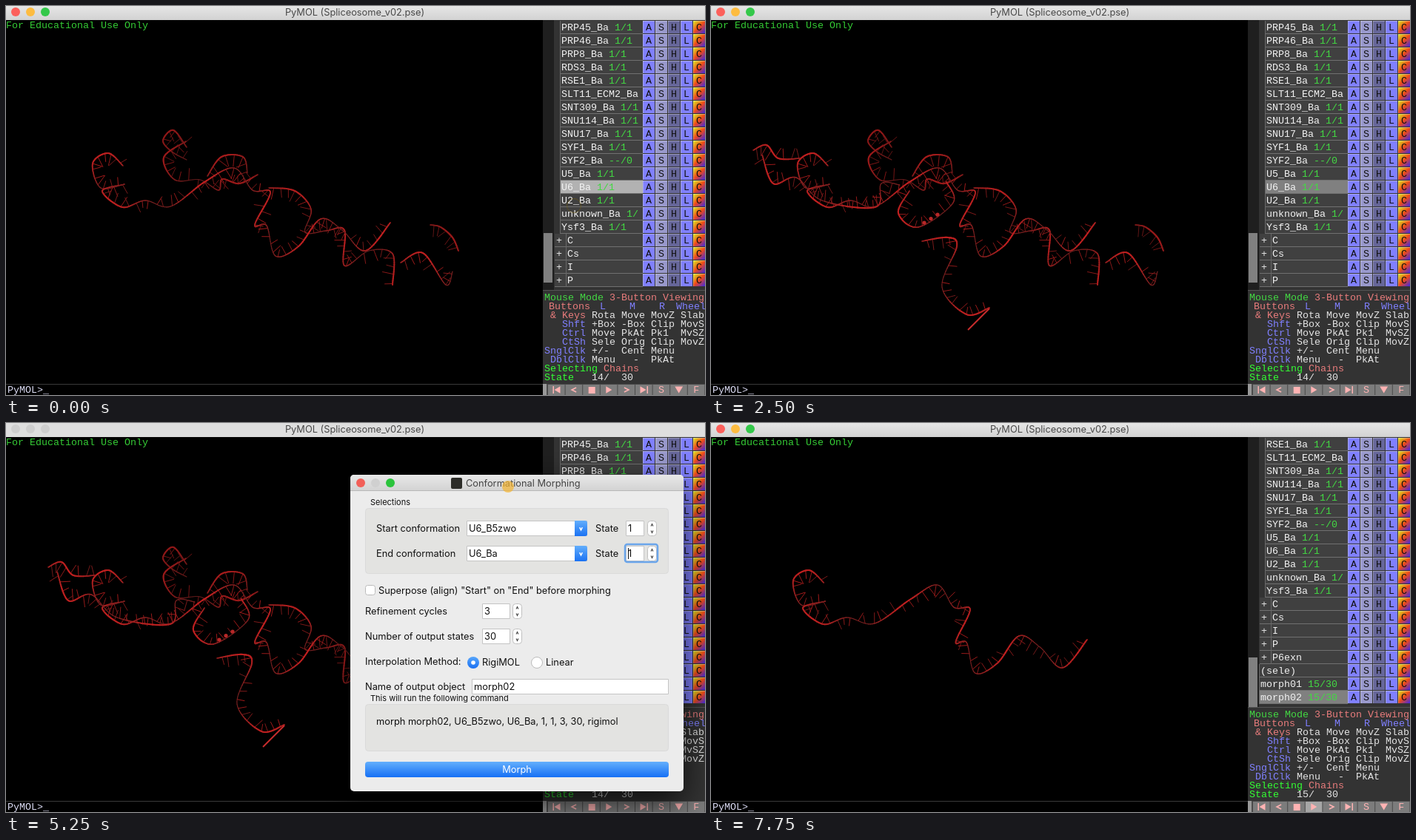
An HTML page with a canvas that plays this animation: 944x526 px, repeating every 8 s.

```html
<!DOCTYPE html>
<html lang="en">
<head>
<meta charset="utf-8">
<title>Morphing</title>
<style>
html, body { margin: 0; width: 944px; height: 526px; overflow: hidden; background: #000; }
canvas { display: block; }
</style>
</head>
<body>
<canvas id="stage" width="944" height="526"></canvas>
<script>
const ctx = document.getElementById('stage').getContext('2d');
const LOOP = 8000, STEP = 250;
// Moments at which the picture changes abruptly, in ms.
const RELEASE = 250, MENU = 2750, MENU_END = 4000, BLUR = 4250, DIALOG = 5250, RESULT = 6500, SCROLL = 7000, PLAY = 7250;
const MONO = '13.33px "Liberation Mono", monospace';
const sans = size => `${size}px Inter, sans-serif`;
const GREEN = '#43d843', RED = '#e87c7c', BLUE = '#8080ff', WHITE = '#e4e4e4';

// ---------- helpers ----------
const mix = (a, b, k) => a + (b - a) * k;
const points = str => str.split(' ').map(p => p.split(',').map(Number));

function rect(x, y, w, h, fill, radius = 0, stroke) {
  ctx.beginPath();
  ctx.roundRect(x, y, w, h, radius);
  ctx.fillStyle = fill;
  ctx.fill();
  if (stroke) { ctx.strokeStyle = stroke; ctx.lineWidth = 1; ctx.stroke(); }
}
function text(str, x, y, color, font = MONO, align = 'left') {
  ctx.font = font;
  ctx.fillStyle = color;
  ctx.textAlign = align;
  ctx.fillText(str, x, y);
}
function disc(x, y, r, fill, stroke) {
  ctx.beginPath();
  ctx.arc(x, y, r, 0, 7);
  if (fill) { ctx.fillStyle = fill; ctx.fill(); }
  if (stroke) { ctx.strokeStyle = stroke; ctx.lineWidth = 1; ctx.stroke(); }
}
function line(pts, color, width = 1) {
  ctx.beginPath();
  pts.forEach(([x, y]) => ctx.lineTo(x, y));
  ctx.strokeStyle = color;
  ctx.lineWidth = width;
  ctx.stroke();
}
function chevron(x, y, dx, dy, color, width) {
  // (dx, dy) points to the tip.
  line([[x - dx + dy, y - dy + dx], [x + dx, y + dy], [x - dx - dy, y - dy - dx]], color, width);
}
function triangle(x, y, dx, dy, color) {
  ctx.beginPath();
  ctx.moveTo(x + dx, y + dy);
  ctx.lineTo(x - dx - dy * 1.2, y - dy - dx * 1.2);
  ctx.lineTo(x - dx + dy * 1.2, y - dy + dx * 1.2);
  ctx.fillStyle = color;
  ctx.fill();
}
function gradient(x0, y0, x1, y1, ...stops) {
  const g = ctx.createLinearGradient(x0, y0, x1, y1);
  stops.forEach((c, i) => g.addColorStop(i / (stops.length - 1), c));
  return g;
}

// ---------- RNA strands, each a spline through a few key points ----------
const firstRna = [
  '244,191 226,168 212,182 224,197 244,208',
  '243,183 213,205 228,235 262,235 287,249 292,234 315,240 340,228',
  '272,230 291,204 320,204 326,226',
  '355,246 390,250 412,275 404,306 432,304 457,303 457,351 490,331 522,335 522,377',
  '533,347 563,334 594,377 603,359'
].map(points);
const secondRna = points('158,216 138,199 117,213 128,246 160,241 130,250 157,272 188,263 222,271 268,238 308,219 333,249 357,252 336,296 352,297 364,338 395,325 425,288 454,303 485,331 519,293');
const fragment = points('573,296 587,299 603,313 611,331');
const thirdRna = [
  '57,195 75,188 91,206 120,206',
  '69,201 84,240 115,232 150,263 222,272 230,240 255,242',
  '268,250 253,280 280,299 327,266 318,238',
  '285,318 320,313 332,325 312,380 345,417 376,408'
].map(points);

// The second RNA slides left and, early in the morph, lifts its left arm.
function morphPose(state) {
  const k = (30 - state) / 15;
  return secondRna.map(([x, y]) => [
    x + k * (8 * Math.exp(-(((x - 265) / 60) ** 2)) - 6 - 0.02 * Math.max(0, x - 265)),
    y - 28 * Math.max(0, k - 1) * Math.max(0, 1 - (x - 110) / 200)
  ]);
}

function sampleSpline(pts) {
  const out = [];
  for (let i = 0; i < pts.length - 1; i++) {
    const [a, b, c, d] = [-1, 0, 1, 2].map(o => pts[Math.min(pts.length - 1, Math.max(0, i + o))]);
    for (let u = 0; u < 1; u += 1 / 16) {
      out.push([0, 1].map(k => b[k] + u / 2 * (c[k] - a[k] +
        u * (2 * a[k] - 5 * b[k] + 4 * c[k] - d[k] + u * (3 * (b[k] - c[k]) + d[k] - a[k])))));
    }
  }
  return [...out, pts[pts.length - 1]];
}

// Backbone ribbon with base sticks on the inner side of each bend.
function drawStrand(pts, seed, light = 1) {
  const curve = sampleSpline(pts);
  const random = () => (seed = (seed * 16807) % 2147483647) / 2147483647;
  let travelled = 0, next = 5, side = 1;
  ctx.lineCap = 'round';
  for (let i = 1; i < curve.length; i++) {
    const [x0, y0] = curve[i - 1], [x, y] = curve[i];
    const shade = Math.sin(travelled / 22);
    line([[x0, y0], [x, y]], `rgb(${light * (152 + 38 * shade)},${light * 32},${light * 32})`, 1.6 + 0.5 * shade);
    travelled += Math.hypot(x - x0, y - y0);
    const p = curve[Math.max(0, i - 8)], q = curve[Math.min(curve.length - 1, i + 8)];
    const bend = (x - p[0]) * (q[1] - y) - (y - p[1]) * (q[0] - x);
    if (Math.abs(bend) > 8) side = Math.sign(bend);
    if (travelled > next) {
      next = travelled + 7 + random() * 5;
      const angle = Math.atan2(q[1] - p[1], q[0] - p[0]) + side * (1.57 + (random() - 0.5) * 0.7);
      const size = 9 + random() * 7;
      line([[x, y], [x + size * Math.cos(angle), y + size * Math.sin(angle)]],
        `rgb(${light * (110 + 55 * random())},${light * 26},${light * 26})`);
    }
  }
  ctx.lineCap = 'butt';
}

function drawMolecule(t, state) {
  const loaded = t < RESULT;
  if (t < SCROLL) firstRna.forEach((s, i) => drawStrand(s, 71 + i, 0.75 + 0.06 * i));
  if (loaded || t >= SCROLL) drawStrand(loaded ? secondRna : morphPose(state), 417);
  if (loaded) drawStrand(fragment, 33, 0.8);
  if (loaded && t >= RELEASE) {
    thirdRna.forEach((s, i) => drawStrand(s, 205 + i));
    line([[376, 409], [347, 438]], '#c82c2c', 2);
    for (let i = 0; i < 3; i++) disc(288 + 9 * i, 293 - 5.5 * i, 2.6, '#b82828');
  }
}

// ---------- object panel ----------
const members = 'PRP45 PRP46 PRP8 RDS3 RSE1 SLT11_ECM2 SNT309 SNU114 SNU17 SYF1 SYF2 U5 U6 U2 unknown Ysf3'.split(' ');
const rows = [
  ...members.map(m => ({ name: m + '_Ba', count: m === 'SYF2' ? '--/0' : '1/1', x: 750 })),
  ...['C', 'Cs', 'I', 'P', 'P6exn'].map(name => ({ name, x: 758, group: true })),
  ...['(sele)', 'morph01', 'morph02'].map(name => ({ name, x: 742, morph: name[0] === 'm' }))
];
const buttons = { A: '#8080ff', S: '#9999cc', H: '#666699', L: '#8080ff', C: null };

function drawRow(row, y, t, state) {
  const cell = (x, w, fill) => { rect(x, y, w, 17, fill); rect(x, y + 17, w, 1, '#707070'); };
  let fill = '#404040';
  if (row.name === 'U6_Ba' && t < RESULT) fill = t < RELEASE ? '#b2b2b2' : '#808080';
  if (row.name === 'morph02') fill = '#808080';
  cell(row.x - 1, 861 - row.x, fill);
  rect(row.x - 2, y, 1, 18, '#686868');
  if (row.group) {
    cell(741, 15, '#404040');
    text('+', 743, y + 13, WHITE);
  }
  text(row.name, row.x, y + 13, '#f2f2f2');
  // The panel is 13 characters wide.
  const count = row.morph ? state + '/30' : row.count || '';
  text(count.slice(0, Math.max(0, 12 - row.name.length)), row.x + 8 * (row.name.length + 1), y + 13, GREEN);

  Object.entries(buttons).forEach(([label, color], i) => {
    const x = 860 + 17 * i;
    rect(x, y, 16, 17, color || gradient(x, y, x + 16, y + 17, '#d8f020', '#f04a18', '#3a28e8'));
    rect(x, y, 16, 1, '#ffffff55');
    rect(x, y, 1, 17, '#ffffff44');
    text(label, x + 4, y + 13, '#111');
  });
}

const modeLines = [
  ['Shft', '+Box -Box Clip MovS'], ['Ctrl', 'Move PkAt Pk1  MvSZ'], ['CtSh', 'Sele Orig Clip MovZ'],
  ['SnglClk', '+/-  Cent Menu'], ['DblClk', 'Menu   -  PkAt']
];

function drawMouseMode(state) {
  text('Mouse Mode', 727, 398, GREEN);
  text('3-Button Viewing', 815, 398, RED);
  text('Buttons', 733, 410, RED);
  text('L    M    R', 802, 410, BLUE);
  text('Wheel', 905, 410, BLUE);
  text('& Keys', 735, 422, RED);
  text('Rota Move MovZ Slab', 791, 422, WHITE);
  modeLines.forEach(([key, actions], i) => {
    text(key, 783, 434 + 12 * i, BLUE, MONO, 'right');
    text(actions, 791, 434 + 12 * i, WHITE);
  });
  text('Selecting', 727, 494, '#33ff33');
  text('Chains', 807, 494, RED);
  text('State', 727, 506, '#33ff33');
  text(String(state).padStart(2) + '/  30', 791, 506, WHITE);
}

function drawControls(playing) {
  const pink = '#ffb3b3', y = 519, at = i => 743.5 + 23.6 * i;
  rect(725, 511, 219, 15, '#4a4a4a');
  rect(725, 511, 5, 15, '#999');
  for (let i = 0; i < 9; i++) rect(at(i) - 11.5, 512, 22.6, 14, playing && i === 3 ? '#a6a6a6' : '#7c7c7c');
  rect(at(0) - 5, 514, 1.5, 10, pink);
  triangle(at(0) + 1, y, -4, 0, pink);
  chevron(at(1), y, -3, 0, pink, 1.6);
  rect(at(2) - 4, 515, 9, 9, pink);
  triangle(at(3), y, 4, 0, pink);
  chevron(at(4), y, 3, 0, pink, 1.6);
  triangle(at(5) - 1, y, 4, 0, pink);
  rect(at(5) + 4, 514, 1.5, 10, pink);
  text('S', at(6), 523, pink, MONO, 'center');
  triangle(at(7), y, 0, 4.5, pink);
  text('F', at(8), 523, pink, MONO, 'center');
}

function drawPanel(t, state) {
  const scrolled = t >= SCROLL;
  rect(725, 19, 219, 492, '#333');
  rect(725, 19, 15, 366, '#1f1f1f');
  rect(726, scrolled ? 317 : t >= RESULT ? 304 : 307, 12, 67, '#808080');
  const first = scrolled ? 4 : 0;
  rows.slice(first, first + 20).forEach((row, i) => drawRow(row, 20 + 18 * i, t, state));
  rect(725, 384, 219, 1, '#555');
  drawMouseMode(state);
  drawControls(t >= PLAY);
}

// ---------- window, menu, dialog ----------
function trafficLights(x, y, colors) {
  colors.forEach((c, i) => disc(x + 20 * i, y, 6, c));
}

function drawWindow(t, state) {
  const inactive = t >= BLUR && t < RESULT;
  rect(0, 0, 944, 526, '#000');
  drawMolecule(t, state);
  text('For Educational Use Only', 0, 30, '#35cc35');
  rect(0, 511, 725, 1, '#3a3a3a');
  text('PyMOL>_', 2, 523, '#dcdcf4');
  drawPanel(t, state);
  rect(0, 0, 944, 19, inactive ? '#dedede' : gradient(0, 0, 0, 19, '#e6e6e6', '#d2d2d2'));
  trafficLights(13, 8, inactive ? Array(3).fill('#cecece') : ['#fc605b', '#fdbc40', '#34c84a']);
  text('PyMOL (Spliceosome_v02.pse)', 471, 13, '#484848', sans(12.8), 'center');
}

const menuGroups = [['Plugin Manager'], ['Legacy Plugins'],
  ['Sheet Exporter', 'Lighting Settings', 'APBS Electrostatics', 'Alignment', 'Morphing']];

function drawMenu(pointerY) {
  ctx.save();
  ctx.shadowColor = '#0008';
  ctx.shadowBlur = 14;
  rect(620, -6, 177, 167, gradient(0, 0, 0, 161, '#bababa', '#9e9e9e'), 5);
  ctx.restore();
  menuGroups.forEach((group, g) => {
    if (g) rect(620, 31 * g - 6, 177, 1, '#8a8a8a');
    group.forEach((label, i) => {
      const y = 31 * g + 19 * i;
      const hot = pointerY >= y && pointerY < y + 19;
      if (hot) rect(620, y, 177, 19, gradient(0, y, 0, y + 19, '#1068e0', '#0459d2'));
      text(label, 641, y + 14, hot ? '#fff' : '#000', sans(13.6));
    });
  });
  triangle(780, 40, 4.5, 0, '#111');
}

function label(str, x, y, size = 12.8) { text(str, x, y, '#111', sans(size)); }
function field(x, y, w, value) {
  rect(x + 0.5, y + 0.5, w - 1, 20, '#fff', 0, '#c4c4c4');
  label(value, x + 3, y + 15);
}
function stepper(x, y) {
  rect(x + 0.5, y + 0.5, 12, 20, '#fff', 4, '#c0c0c0');
  chevron(x + 6.5, y + 6, 0, -1.4, '#444', 1.2);
  chevron(x + 6.5, y + 15, 0, 1.4, '#444', 1.2);
}
function groupBox(title, x, y, h) {
  label(title, 492, y - 4, 11);
  rect(x + 0.5, y + 0.5, 409, h, '#e3e3e1', 4, '#dadada');
}
function numberRow(title, y, value) {
  label(title, 485, y + 15);
  field(643, y, 38, value);
  stepper(684, y);
}
function conformationRow(title, y, value) {
  label(title, 500, y + 15);
  field(622, y, 163, value);
  rect(768, y, 17, 21, gradient(0, y, 0, y + 21, '#62aefc', '#1a72f3'), [0, 3, 3, 0]);
  chevron(776.5, y + 11, 0, 1.8, '#fff', 1.5);
  label('State', 796, y + 15);
  field(837, y, 25, '1');
  stepper(866, y);
}

function drawDialog() {
  ctx.save();
  ctx.shadowColor = '#000b';
  ctx.shadowBlur = 45;
  ctx.shadowOffsetY = 16;
  rect(465, 70, 450, 428, '#ececec', 5);
  ctx.restore();
  rect(465, 70, 450, 22, gradient(0, 70, 0, 92, '#e8e8e8', '#d2d2d2'), [5, 5, 0, 0]);
  rect(465, 91, 450, 1, '#b8b8b8');
  trafficLights(479, 81, ['#f25f58', '#d0d0d0', '#2bc43c']);
  rect(601, 74, 15, 15, '#2c2c28', 2);
  text('Conformational Morphing', 621, 86, '#444', sans(12.8));

  groupBox('Selections', 485, 115, 88);
  conformationRow('Start conformation', 132, 'U6_B5zwo');
  conformationRow('End conformation', 166, 'U6_Ba');
  ctx.beginPath();
  ctx.roundRect(836, 164, 44, 24, 3);
  ctx.strokeStyle = '#6aa5ea';
  ctx.lineWidth = 2.5;
  ctx.stroke();
  rect(840, 169, 1, 15, '#111');

  rect(485.5, 219.5, 13, 13, '#fff', 3, '#bbb');
  label('Superpose (align) "Start" on "End" before morphing', 503, 231);
  numberRow('Refinement cycles', 244, '3');
  numberRow('Number of output states', 278, '30');
  label('Interpolation Method:', 485, 327);
  disc(631, 324, 8, gradient(0, 316, 0, 332, '#57a6fb', '#1a70f2'));
  disc(631, 324, 2.8, '#fff');
  label('RigiMOL', 643, 328);
  disc(717, 324, 7.5, '#fff', '#bbb');
  label('Linear', 729, 328);
  label('Name of output object', 485, 361);
  field(629, 346, 266, 'morph02');
  groupBox('This will run the following command', 485, 380, 63);
  label('morph morph02, U6_B5zwo, U6_Ba, 1, 1, 3, 30, rigimol', 500, 408);
  rect(485, 458, 410, 21, gradient(0, 458, 0, 479, '#64affc', '#1670f5'), 4);
  text('Morph', 690, 473, '#fff', sans(12.8), 'center');
}

// ---------- pointer and timeline ----------
// Each move: start, end, from, to.
const moves = [
  [0, 1750, [767, 270], [744, 243]],
  [1750, 2500, [744, 243], [650, -12]],
  [2750, 3500, [650, 4], [654, 145]],
  [5250, 6250, [678, 86], [690, 468]],
  [6500, 7000, [561, 277], [732, 345]]
];

function pointerAt(t) {
  const move = moves.filter(m => m[0] <= t).pop();
  const u = Math.min(1, (t - move[0]) / (move[1] - move[0]));
  const eased = u * u * (3 - 2 * u);
  return [0, 1].map(k => mix(move[2][k], move[3][k], eased));
}

function drawPointer(t, [x, y]) {
  if ((t >= MENU_END && t < DIALOG) || t >= SCROLL) return;
  const pressed = (t >= 3500 && t < MENU_END) || (t >= DIALOG && t < RESULT);
  if (pressed) disc(x, y, 8, '#f5b32fb0');
  else disc(x, y, 9.5, null, '#80640070');
}

function render(t) {
  const state = t < RESULT ? 14 : 1 + 7 * Math.max(0, t - PLAY) / STEP;
  const pointer = pointerAt(t);
  drawWindow(t, state);
  if (t >= MENU && t < MENU_END) drawMenu(pointer[1]);
  if (t >= DIALOG && t < RESULT) drawDialog();
  drawPointer(t, pointer);
}

let shown = -1;
function tick() {
  const t = Math.floor(performance.now() % LOOP / STEP) * STEP;
  if (t !== shown) render(shown = t);
  requestAnimationFrame(tick);
}
tick();
</script>
</body>
</html>
```
